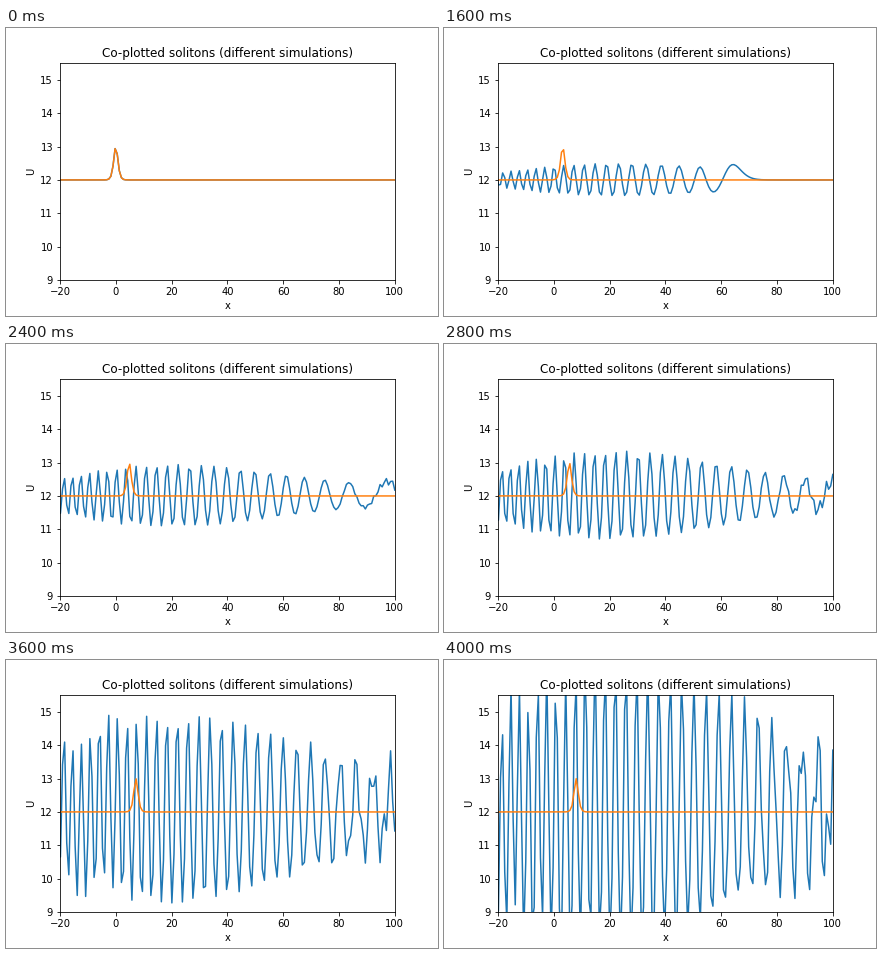
Recreate the animation shown at these times as a matplotlib script. Size 432 by 288 pixels, loop 4.1 s.

```python
import numpy as np
import matplotlib.pyplot as plt
from matplotlib.animation import FuncAnimation

FRAMES = 41
INTERVAL = 100          # ms
BASE = 12               # background level of U

STEPS = 100             # Euler steps per frame
DT = 1 / STEPS
ADVECT = 0.346          # factor of U * U_x, per frame
DISPERSE = 0.173        # factor of U_xxx, per frame
SOLITON_SPEED = 0.2     # x units per frame

x = np.linspace(-50, 100, 200)
H = x[1] - x[0]


def soliton(centre):
    return BASE + 1 / np.cosh(x - centre) ** 2


def euler_step(u):
    """One KdV step with central differences on a periodic grid."""
    right, left = np.roll(u, -1), np.roll(u, 1)
    right2, left2 = np.roll(u, -2), np.roll(u, 2)
    mean = (left + u + right) / 3
    ux = (right - left) / (2 * H)
    uxxx = (right2 - 2 * right + 2 * left - left2) / (2 * H ** 3)
    return u - DT * (ADVECT * mean * ux + DISPERSE * uxxx)


def simulate():
    u = soliton(0)
    states = [u]
    for _ in range(FRAMES - 1):
        for _ in range(STEPS):
            u = euler_step(u)
        states.append(u)
    return states


waves = simulate()

plt.rcParams["font.family"] = "DejaVu Sans"
fig, ax = plt.subplots(figsize=(6, 4), dpi=72)
fig.subplots_adjust(left=0.125, right=0.9, bottom=0.125, top=0.88)
ax.set_title("Co-plotted solitons (different simulations)")
ax.set_xlabel("x")
ax.set_ylabel("U")
ax.set_xlim(-20, 100)
ax.set_ylim(9, 15.52)

wave_line, = ax.plot(x, waves[0], color="C0")
soliton_line, = ax.plot(x, soliton(0), color="C1")


def update(i):
    wave_line.set_ydata(waves[i])
    soliton_line.set_ydata(soliton(SOLITON_SPEED * i))
    return wave_line, soliton_line


anim = FuncAnimation(fig, update, frames=FRAMES, interval=INTERVAL,
                     repeat=True, repeat_delay=0)
plt.show()
```
